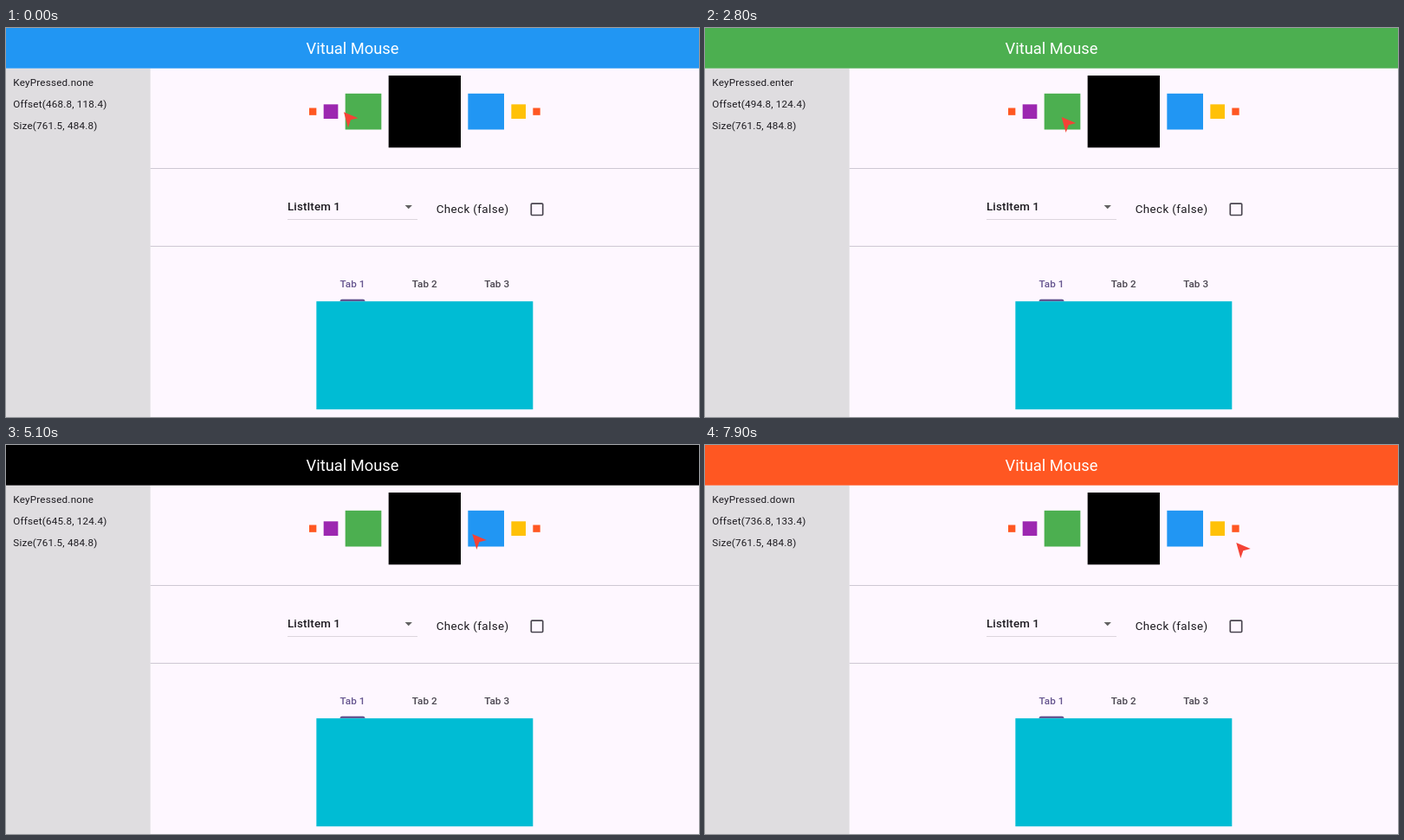
An HTML page with a canvas that plays this animation: 800 px wide and 450 px high, repeating every 8000 ms.

```html
<!DOCTYPE html>
<html lang="en">
<head>
<meta charset="utf-8">
<title>Vitual Mouse</title>
<style>
html, body { margin: 0; width: 100%; height: 100%; overflow: hidden; background: #fef7ff; }
canvas { display: block; width: 800px; height: 450px; }
</style>
</head>
<body>
<canvas id="stage" width="800" height="450"></canvas>
<script>
const ctx = document.getElementById('stage').getContext('2d');
const LOOP = 8000, STEP = 100, LAG = 20;
const U = 5 / 6; // stage pixels per layout unit

const BLUE = '#2196f3', PURPLE = '#9c27b0', GREEN = '#4caf50', ORANGE = '#ff5722';
const INK = '#1d1b20', MUTED = '#49454f', ACCENT = '#65558f';

// Value tracks: [time, value]
const headers = [[0, BLUE], [1300, PURPLE], [2700, GREEN], [4100, '#000'], [7400, ORANGE]];
const keys = [
  [0, 'none'], [300, 'left'], [600, 'none'], [1300, 'enter'], [1400, 'none'],
  [1700, 'down'], [1900, 'none'], [2000, 'right'], [2500, 'none'],
  [2700, 'enter'], [2900, 'none'], [3200, 'right'], [3800, 'none'],
  [4100, 'enter'], [4200, 'none'], [4600, 'right'], [5100, 'none'],
  [5200, 'right'], [5400, 'none'], [5600, 'right'], [6000, 'none'],
  [7400, 'enter'], [7500, 'none'], [7800, 'down']
];

// Pointer moves: [start, end, dx, dy]
const origin = { x: 468, y: 118 };
const moves = [
  [-20, 0, 0, -1], [280, 460, -25, 0], [1690, 1745, 0, 7], [1945, 2400, 51, 0],
  [3190, 3791, 83, 0], [4590, 5090, 69, 0], [5110, 5380, 45, 0],
  [5590, 5916, 45, 0], [6740, 6780, 0, -5], [7779, 7908, 0, 18]
];

const squares = [
  [10, ORANGE], [20, PURPLE], [50, GREEN], [100, '#000'],
  [50, BLUE], [20, '#ffc107'], [10, ORANGE]
];

function valueAt(track, t) {
  let value = track[0][1];
  for (const [start, v] of track) if (t >= start) value = v;
  return value;
}

function pointerAt(t) {
  let { x, y } = origin;
  for (const [start, end, dx, dy] of moves) {
    const p = Math.min(1, Math.max(0, (t - start) / (end - start)));
    x += dx * p;
    y += dy * p;
  }
  return { x: Math.round(x) + 0.8, y: Math.round(y) + 0.4 };
}

function rect(color, x, y, w, h) {
  ctx.fillStyle = color;
  ctx.fillRect(x, y, w, h);
}

function polygon(color, points) {
  ctx.fillStyle = color;
  ctx.beginPath();
  for (const [x, y] of points) ctx.lineTo(x, y);
  ctx.fill();
}

function text(str, x, y, size, color, { weight = 400, spacing = 0, align = 'left' } = {}) {
  ctx.font = `${weight} ${size * U}px Roboto, sans-serif`;
  ctx.letterSpacing = spacing * U + 'px';
  ctx.textAlign = align;
  ctx.fillStyle = color;
  ctx.fillText(str, x, y);
}

function drawSidebar(key, pos) {
  rect('#dfdde0', 0, 56 * U, 200 * U, 450);
  const lines = [
    `KeyPressed.${key}`,
    `Offset(${pos.x.toFixed(1)}, ${pos.y.toFixed(1)})`,
    'Size(761.5, 484.8)'
  ];
  lines.forEach((line, i) => text(line, 10 * U, 67.3 + 25 * i, 14, INK, { spacing: 0.25 }));
}

function drawSquares() {
  let x = 420;
  for (const [size, color] of squares) {
    rect(color, x * U, (116 - size / 2) * U, size * U, size * U);
    x += size + 10;
  }
}

function drawForm() {
  text('ListItem 1', 325, 210.6, 16, INK, { weight: 500, spacing: 0.15 });
  rect('#dcd5dd', 325, 221, 150, 1);
  polygon('#616161', [[460.6, 205], [468.9, 205], [464.75, 209.3]]);
  text('Check (false)', 496.7, 214.3, 16, INK, { spacing: 0.5 });
  ctx.strokeStyle = MUTED;
  ctx.lineWidth = 2 * U;
  ctx.beginPath();
  ctx.roundRect(606.3, 203.1, 13.4, 13.4, 1);
  ctx.stroke();
}

function drawTabs() {
  for (let i = 0; i < 3; i++) {
    text(`Tab ${i + 1}`, 400 + 250 / 3 * i, 300, 14, i ? MUTED : ACCENT,
      { weight: 500, spacing: 0.1, align: 'center' });
  }
  ctx.fillStyle = ACCENT;
  ctx.beginPath();
  ctx.roundRect(385.5, 313.8, 29, 2.5, [2.5, 2.5, 0, 0]);
  ctx.fill();
  rect('#00bcd4', 430 * U, 316.2, 250, 125);
}

function drawPointer(pos) {
  const x = pos.x * U - 0.7, y = pos.y * U - 0.7;
  polygon('#f44336', [[x, y], [x + 16.5, y + 7], [x + 8, y + 9.2], [x + 5, y + 18]]);
}

function draw(now) {
  const t = Math.floor(now % LOOP / STEP) * STEP;
  rect('#fef7ff', 0, 0, 800, 450);
  drawSidebar(valueAt(keys, t), pointerAt(t - LAG));
  rect(valueAt(headers, t), 0, 0, 800, 56 * U);
  text('Vitual Mouse', 400, 29.6, 22, '#fff', { align: 'center' });
  for (const y of [162, 252]) rect('#cec8d3', 200 * U, y, 800, 1);
  drawSquares();
  drawForm();
  drawTabs();
  drawPointer(pointerAt(t));
}

const begin = performance.now();
function tick() {
  draw(performance.now() - begin);
  requestAnimationFrame(tick);
}
tick();
</script>
</body>
</html>
```
